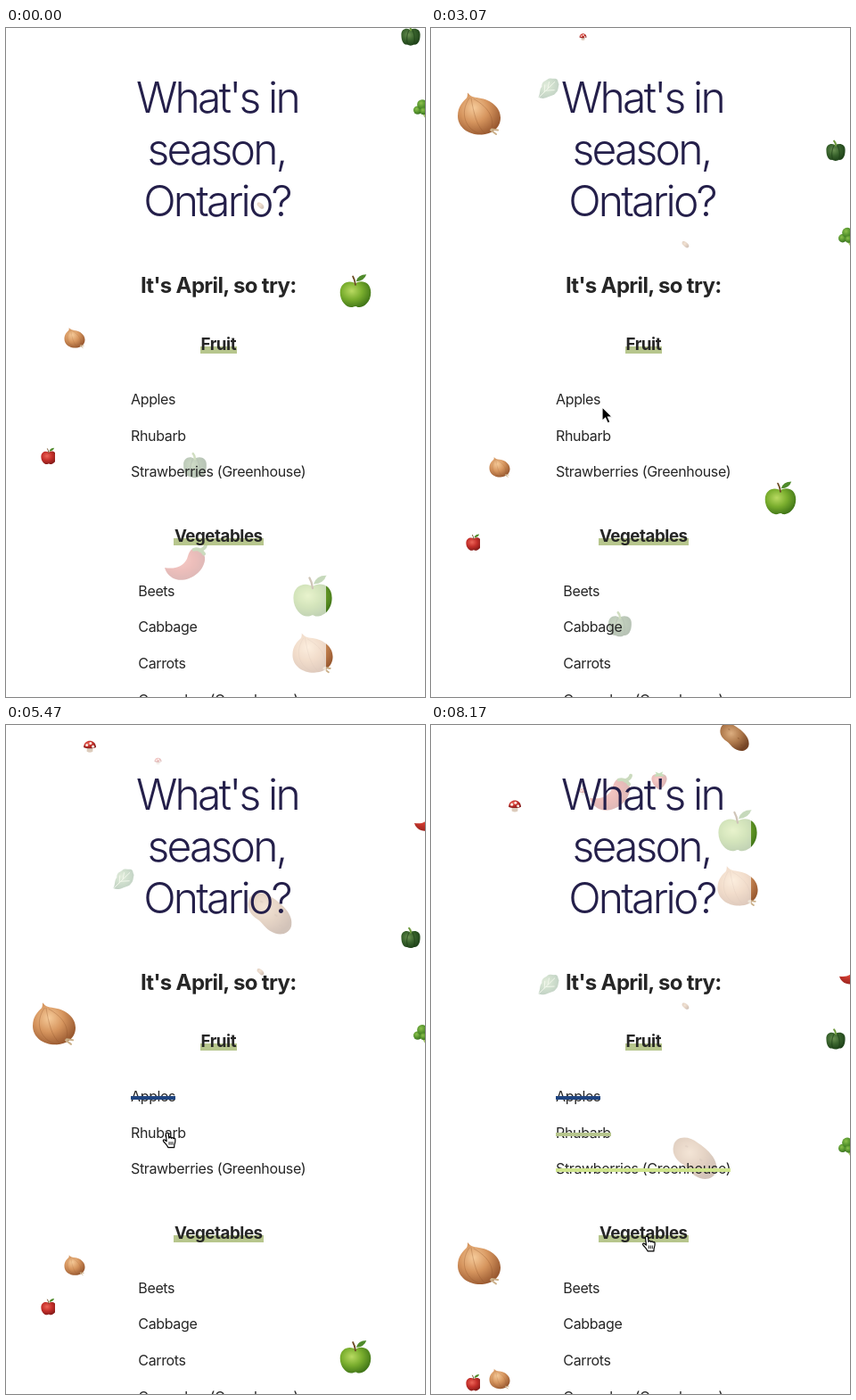
An HTML page for the animation above (8.21 s loop, 470 by 750 pixels).

```html
<!DOCTYPE html>
<html lang="en">
<head>
<meta charset="utf-8">
<title>What's in season</title>
<style>
html, body { margin: 0; width: 100%; height: 100%; overflow: hidden; background: #fff; }
svg { display: block; width: 470px; height: 750px; }
text { font: 16px Inter, Roboto, sans-serif; letter-spacing: -.35px; fill: #262626; }
.title { font-size: 48px; font-weight: 300; letter-spacing: -.058em; fill: #241f4a; }
.lead { font-size: 24px; font-weight: 700; letter-spacing: -.027em; }
.head { font-size: 18.72px; font-weight: 700; letter-spacing: -.024em; }
.title, .lead, .head { text-anchor: middle; }
</style>
</head>
<body>
<svg viewBox="0 0 470 750">
  <defs id="paints"></defs>
  <defs>
    <g id="onion">
      <path fill="url(#gOnion)" d="M-26-46c6 8 12 10 26 12c28 4 48 22 48 44c0 24-20 38-46 38s-50-16-50-42c0-22 12-32 20-40c2-4 2-8 2-12z"/>
      <path stroke="#8a4f28" stroke-opacity=".3" stroke-width="2" d="M-22-34C-46 0-30 40 6 47M-18-34C-12 0-6 30 14 46M-12-32C24-12 36 14 26 40"/>
      <path stroke="#cbb08a" stroke-width="4" d="M28 36l14 2M26 38l12 9"/>
    </g>
    <path id="body" d="M0-24C14-36 48-32 48 4C48 34 26 50 12 50C4 50 4 47 0 47S-6 50-14 50C-28 50-48 32-48 4C-48-30-16-36 0-24z"/>
    <g id="stalk">
      <path stroke="#6b4a22" stroke-width="5" d="M0-20Q-2-36-8-46"/>
      <path fill="#4f8a2b" d="M2-30Q8-52 34-52Q28-32 2-30z"/>
    </g>
    <g id="apple"><use href="#body" fill="url(#gGreen)"/><use href="#stalk"/></g>
    <g id="redApple"><use href="#body" fill="url(#gRed)"/><use href="#stalk"/></g>
    <g id="pepper">
      <path fill="url(#gPepper)" d="M-4-26C-20-38-48-30-46 0C-46 30-34 48-18 46C-8 52 8 52 16 46C34 48 46 30 46 0C48-30 20-38-4-26z"/>
      <path stroke="#1c3d14" stroke-opacity=".6" stroke-width="5" d="M-10-22Q-24 10-16 42M10-22Q24 10 16 42"/>
      <path stroke="#6f9a3f" stroke-width="9" d="M0-24Q0-38-8-46"/>
    </g>
    <g id="chili">
      <path fill="url(#gChili)" d="M16-34C30-38 46-26 44-8C40 24 4 44-22 38C-36 34-46 24-50 10C-30 14-8 10 2-10C6-22 8-30 16-34z"/>
      <path stroke="#5f8f35" stroke-width="8" d="M18-32Q32-36 42-22M32-30Q44-34 46-42"/>
    </g>
    <g id="potato">
      <path fill="url(#gPotato)" d="M-48-26C-44-50-14-50 6-34C28-20 54 4 48 30C42 50 18 52 0 40C-12 32-18 20-28 14C-42 6-52-10-48-26z"/>
      <path stroke="#7a4a25" stroke-opacity=".4" stroke-width="4" d="M-20-26l3 1M12 4l3 2M22 28l3 0"/>
    </g>
    <g id="broccoli">
      <path fill="#a5c86a" d="M-22 4L6 46Q22 48 26 34L20-8z"/>
      <g fill="url(#gBroccoli)"><circle cx="-32" cy="4" r="18"/><circle cx="-12" cy="-20" r="22"/><circle cx="20" cy="-24" r="24"/><circle cx="34" cy="4" r="16"/><circle cx="-6" cy="8" r="15"/></g>
    </g>
    <g id="leaf">
      <path fill="url(#gLeaf)" d="M-48 42C-38 22-44 4-32-8C-34-28-18-34-8-40C4-52 20-44 30-46C46-44 42-30 48-20C44-4 46 10 34 20C24 36 6 34-8 42C-24 50-36 46-48 42z"/>
      <path stroke="#dcebc8" stroke-width="4" d="M-44 40L28-30M-20 16L-18-16M-4 0L2-30M-12 10L26 8"/>
    </g>
    <g id="berry">
      <path fill="url(#gRed)" d="M0-30C22-42 48-28 42-2C36 24 14 48 0 50C-14 48-36 24-42-2C-48-28-22-42 0-30z"/>
      <path fill="#4f9a2b" d="M0-24L-30-22L-16-36L-22-48L0-40L20-50L16-36L32-24z"/>
    </g>
    <g id="mushroom">
      <path fill="#dccbbb" d="M-24 4L-24 40Q0 54 24 40L24 4z"/>
      <path fill="url(#gRed)" d="M-50 6C-48-30-24-46 0-46S48-30 50 6C34 18-34 18-50 6z"/>
      <g fill="#f8e9e2"><circle cx="-24" cy="-12" r="11"/><circle cx="6" cy="-26" r="11"/><circle cx="26" cy="0" r="11"/></g>
    </g>
  </defs>

  <g id="under" fill="none" stroke-linecap="round"></g>
  <path fill="#fff" d="M55 460h5v290h-5z"/>
  <g id="over" fill="none" stroke-linecap="round"></g>
  <path fill="#fff" fill-opacity=".68" d="M117 30h242v720H117z"/>
  <path fill="#b7c68d" d="M218 357h41v8h-41zM188 572h101v8H188z"/>

  <text class="title" x="237" y="94.5">What's in</text>
  <text class="title" x="236" y="152.5">season,</text>
  <text class="title" x="236.5" y="210.5">Ontario?</text>
  <text class="lead" x="238.3" y="297">It's April, so try:</text>
  <text class="head" x="238.3" y="361">Fruit</text>
  <text x="140" y="422">Apples</text>
  <text x="140" y="462.5">Rhubarb</text>
  <text x="140" y="503">Strawberries (Greenhouse)</text>
  <text class="head" x="238.3" y="576">Vegetables</text>
  <text x="148.3" y="637">Beets</text>
  <text x="148.3" y="677">Cabbage</text>
  <text x="148.3" y="718">Carrots</text>
  <text x="148.3" y="758.5">Cucumber (Greenhouse)</text>

  <g id="strikes"></g>
  <g id="cursor">
    <path id="arrow" fill="#000" stroke="#fff" stroke-width="1.2" d="M0 0V15.5L3.6 12.2L6.2 18L9 16.8L6.5 11.2H11.4z"/>
    <g id="hand" transform="translate(-6 0)" fill="none" stroke="#000" stroke-linejoin="round">
      <path fill="#fff" stroke-width="1.2" d="M3.5 1.8c0-2 3-2 3 0l.6 4.6c.3-1.3 2.3-1.3 2.6.2.5-1 2.2-.9 2.4.4.7-.7 2-.5 2 .8.3 3-.4 4-1 6.2l-.2 2.9H6.2C5 14.5 2.5 12 .8 9.8C0 8.5 1.5 7.6 2.8 8.7L4.4 10z"/>
      <path stroke-width=".9" d="M7.3 10.5v3.5M9.3 10.5v3.5M11.3 10.5v3.5"/>
    </g>
  </g>
</svg>
<script>
const LOOP = 8.21;
const $ = id => document.getElementById(id);

// light, middle and dark tone of each skin
const tones = {
  gOnion: ['#f6cb9a', '#d6955e', '#9a5a31'],
  gGreen: ['#b9da62', '#7aae2e', '#3f7417'],
  gRed: ['#ec6558', '#c42f2a', '#821a18'],
  gPepper: ['#6a9152', '#38622c', '#1d4018'],
  gChili: ['#e5604f', '#c8362c', '#94231e'],
  gPotato: ['#dcae80', '#b07a4c', '#754425'],
  gBroccoli: ['#8cc04c', '#5c9a31', '#37701f'],
  gLeaf: ['#a3c490', '#6c9c66', '#3f7148']
};
$('paints').innerHTML = Object.entries(tones).map(([id, c]) =>
  `<radialGradient id="${id}" cx=".38" cy=".36" r=".68">` +
  c.map((tone, i) => `<stop offset="${i / 2}" stop-color="${tone}"/>`).join('') +
  '</radialGradient>').join('');

// shape, x, size, y at time 0, pixels per second
const items = [
  ['redApple', 48, 18, 480, 31.5],
  ['pepper', 454, 23, 8, 42.1],
  ['broccoli', 470, 26, 91, 46.8],
  ['potato', 285.5, 8, 199, 14.2],
  ['apple', 392, 36, 295, 75.6],
  ['onion', 77, 24, 347, 47.2],
  ['pepper', 212, 28, 490, 58],
  ['chili', 202, 48, 600, 87],
  ['apple', 344, 45, 637, 92],
  ['onion', 344, 47, 700, 93.5],
  ['onion', 54, 50, -210, 99.5],
  ['leaf', 132, 24, -66.8, 43.8],
  ['mushroom', 170.5, 8, -29, 12.7],
  ['potato', 296, 50, -345, 101.6],
  ['mushroom', 94, 14, -111, 24.7],
  ['chili', 473, 30, -241, 63.6],
  ['chili', 202, 48, -634, 87],
  ['apple', 344, 45, -633, 92],
  ['onion', 344, 47, -584, 93.5],
  ['potato', 340.5, 33, -477, 60],
  ['berry', 256, 20, -330, 48]
];
const addUse = ([shape]) => `<use href="#${shape}"/>`;
$('under').innerHTML = addUse(items[0]);
$('over').innerHTML = items.slice(1).map(addUse).join('');
const sprites = [...$('under').children, ...$('over').children];

// start time, y, width, colour
const strikes = [
  [4.9, 416, 50, '#1f4480'],
  [5.75, 457, 62, '#b7c68d'],
  [6.7, 497, 196, '#cfe48c']
];
$('strikes').innerHTML = strikes.map(([, y, , color]) =>
  `<rect x="140" y="${y}" height="4" fill="${color}"/>`).join('');
const bars = [...$('strikes').children];

// time, x, y of the pointer tip
const path = [
  [1.95, 470, 640], [2.37, 328, 518], [2.95, 195, 426], [3.4, 178, 420],
  [5.1, 179, 420], [5.55, 182, 460], [5.95, 182, 460], [6.25, 184, 489],
  [7.2, 184, 489], [7.9, 243, 573], [LOOP, 243, 573]
];
const clamp = v => Math.min(1, Math.max(0, v));
const ease = v => v * v * (3 - 2 * v);

function pointer(t) {
  const i = Math.max(1, path.findIndex(p => p[0] >= t));
  const [a, b] = [path[i - 1], path[i]];
  const k = ease(clamp((t - a[0]) / (b[0] - a[0])));
  return [a[1] + (b[1] - a[1]) * k, a[2] + (b[2] - a[2]) * k];
}

function show(el, on) { el.setAttribute('visibility', on ? 'visible' : 'hidden'); }

function draw(now) {
  const t = now / 1000 % LOOP;
  items.forEach(([, x, size, y, speed], i) =>
    sprites[i].setAttribute('transform', `translate(${x} ${y + speed * t}) scale(${size / 100})`));
  strikes.forEach(([start, , width], i) =>
    bars[i].setAttribute('width', width * ease(clamp((t - start) / .25))));
  $('cursor').setAttribute('transform', `translate(${pointer(t)})`);
  show($('arrow'), t >= path[0][0] && t < 4);
  show($('hand'), t >= 4);
  requestAnimationFrame(draw);
}
draw(performance.now());
</script>
</body>
</html>
```
